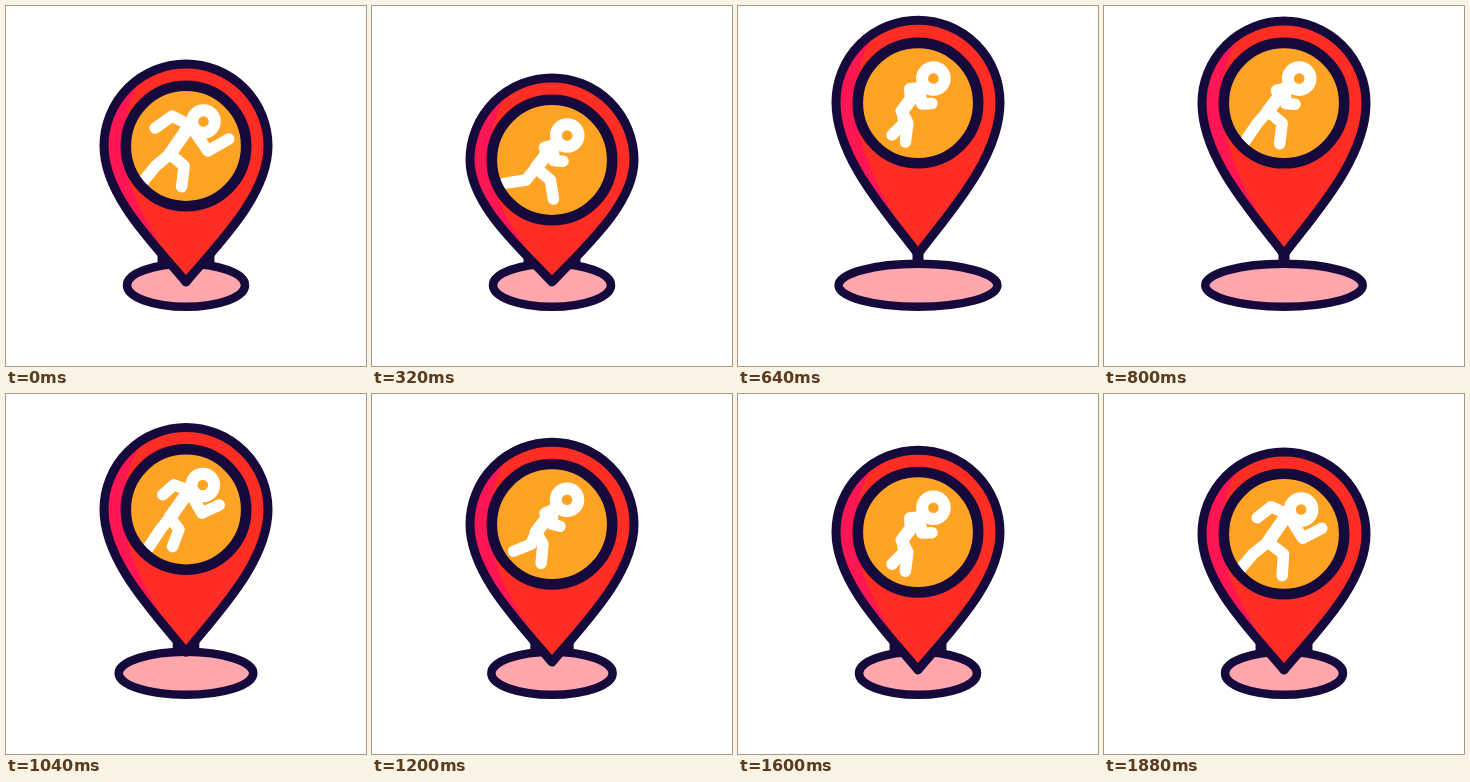
An HTML page with a canvas for the animation above (1.92 s loop, 360 px wide and 360 px high).

```html
<!DOCTYPE html>
<html>
<head>
<meta charset="utf-8">
<style>
html, body { margin: 0; height: 100%; overflow: hidden; background: #fff; }
canvas { display: block; width: 360px; height: 360px; }
</style>
</head>
<body>
<canvas id="stage" width="360" height="360"></canvas>
<script>
const g = document.getElementById('stage').getContext('2d');
const LOOP = 1920, STRIDE = 960, STEP = 40;
const INK = '#160a3d', RED = '#ff2d24', ROSE = '#ff1653', AMBER = '#ffa324', BLUSH = '#ffa7ad';

const ramp = (t, from, to) => Math.min(1, Math.max(0, (t - from) / (to - from)));
const smooth = u => u * u * (3 - 2 * u);
const cubicOut = u => 1 - (1 - u) ** 3;
const wave = (t, peak, period) => Math.cos((t - peak) / period * 2 * Math.PI);
const mix = (a, b, u) => a + (b - a) * u;

// Crouch, jump, fall and settle; the disc follows the jump a little late
function hop(t, lag = 0) {
  const crouch = smooth(ramp(t, 0, 320));
  const rise = cubicOut(ramp(t - lag, 320, 700));
  const fall = smooth(ramp(t, 740, 1360));
  const settle = smooth(ramp(t, 1360, LOOP));
  return { y: 140 + 14 * crouch - 58 * rise + 41 * fall + 3 * settle, air: rise - fall };
}

function line(...points) {
  g.beginPath();
  for (const [x, y] of points) g.lineTo(x, y);
  g.stroke();
}

function circle(x, y, r) {
  g.beginPath();
  g.arc(x, y, r, 0, 7);
}

function pinPath(cy, tip) {
  const len = tip - cy, r = 82;
  g.beginPath();
  g.arc(180, cy, r, Math.PI, 0);
  g.bezierCurveTo(180 + r, cy + len * .37, 210, cy + len * .735, 180, tip);
  g.bezierCurveTo(150, cy + len * .735, 180 - r, cy + len * .37, 180 - r, cy);
  g.closePath();
}

function drawShadow(tip, rx) {
  const neck = 5.5 + Math.max(0, tip - 249) * .85;
  g.fillStyle = INK;
  g.fillRect(180 - neck, 246, 2 * neck, 16);
  g.beginPath();
  g.ellipse(180, 279.3, rx, 21.5, 0, 0, 7);
  g.fillStyle = BLUSH;
  g.fill();
  g.lineWidth = 8.5;
  g.stroke();
}

function drawPin(cy, tip) {
  const len = tip - cy;
  pinPath(cy, tip);
  g.fillStyle = ROSE;
  g.fill();
  g.save();
  g.clip();
  g.beginPath();
  g.moveTo(150, cy - 84);
  g.bezierCurveTo(130, cy - 66, 117, cy - 35, 117, cy);
  g.bezierCurveTo(117, cy + len * .3, 146, cy + len * .65, 178, tip);
  g.lineTo(270, tip);
  g.lineTo(270, cy - 84);
  g.fillStyle = RED;
  g.fill();
  g.restore();
  pinPath(cy, tip);
  g.lineWidth = 9;
  g.stroke();
}

// Knee and foot swing together around their middle positions
function drawLeg(hip, swing, kneeX, kneeSwing, footX, footSwing, footY, lift) {
  line(hip, [kneeX + kneeSwing * swing, 20], [footX + footSwing * swing, footY + lift * swing]);
}

function drawRunner(t) {
  // Arms open twice per stride
  const open = (.5 + .5 * wave(t, 10, STRIDE / 2)) ** 1.5;
  const joint = (x0, y0, x1, y1) => [mix(x0, x1, open), mix(y0, y1, open)];
  const hip = [-16, 8], shoulder = joint(1, -14, 4, -21);

  g.strokeStyle = '#fff';
  g.lineWidth = 11.5;
  drawLeg(hip, wave(t, 435, STRIDE), -14, 17, -19, 28, 39, 0);
  drawLeg(hip, wave(t, 880, STRIDE), -14, 14, -26, 25, 32, 10);
  line(shoulder, joint(-7, -11, -14, -30), joint(-3, -6, -31, -18));
  line(shoulder, joint(0, 0, 22, 5), joint(8, 2, 43, -7));
  g.lineWidth = 13;
  line(shoulder, hip);
  circle(mix(15, 17.5, open), -24.5, 11.3);
  g.fillStyle = AMBER;
  g.fill();
  g.lineWidth = 12;
  g.stroke();
}

function draw(t) {
  const { y, air } = hop(t);
  const tip = 276 - 28 * air ** .7;
  g.clearRect(0, 0, 360, 360);
  g.lineCap = g.lineJoin = 'round';
  g.strokeStyle = INK;
  drawShadow(tip, 59 + 20.5 * air ** 1.4);
  drawPin(y, tip);

  g.save();
  g.translate(180, hop(t, STEP).y);
  circle(0, 0, 60.2);
  g.fillStyle = AMBER;
  g.fill();
  g.save();
  g.clip();
  drawRunner(t);
  g.restore();
  g.lineWidth = 10.6;
  circle(0, 0, 60.2);
  g.stroke();
  g.restore();
}

const start = performance.now();
function tick() {
  const t = (performance.now() - start) % LOOP;
  draw(Math.floor(t / STEP) * STEP);
  requestAnimationFrame(tick);
}
tick();
</script>
</body>
</html>
```
